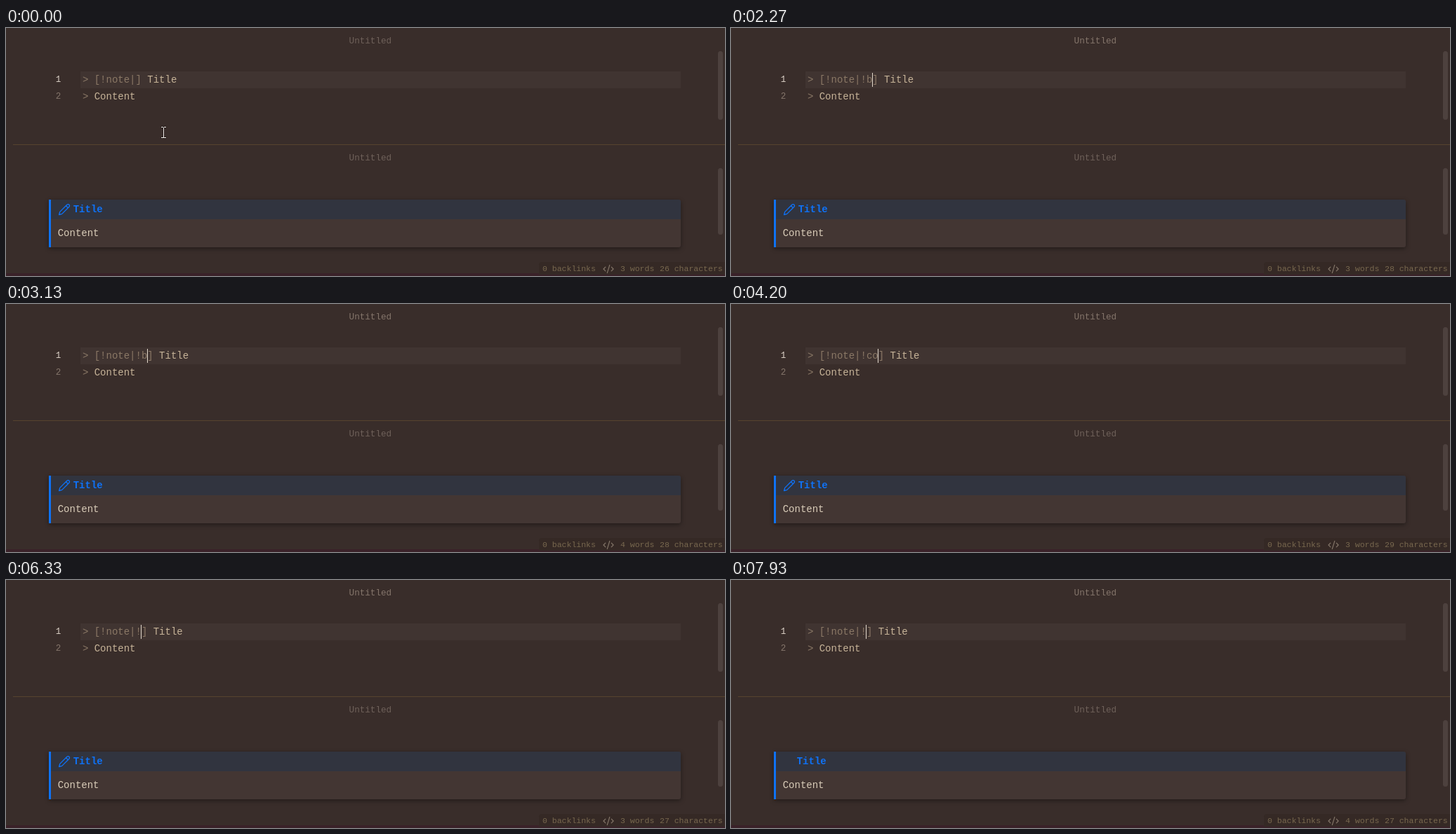
These frames come from a looping animation (1024x354 px, 8 s). An HTML page with a canvas:

```html
<!DOCTYPE html>
<html lang="en">
<head>
<meta charset="utf-8">
<title>Callout editor</title>
<style>
  html, body { margin: 0; width: 100%; height: 100%; overflow: hidden; background: #392d2a; }
  canvas { display: block; }
</style>
</head>
<body>
<canvas id="stage" width="1024" height="354"></canvas>
<script>
const ctx = document.getElementById('stage').getContext('2d');
const LOOP = 8000;
const CHAR = 8.4;
const META_X = 125.7;
const MONO = '"Liberation Mono", monospace';

const C = {
  bg: '#392d2a', line: '#403431', divider: '#57432f', thumb: '#4d413e',
  dim: '#6f615a', bright: '#84756b', mark: '#8a7866', text: '#c6b398',
  body: '#d9ccb8', blue: '#0f72f7', head: '#31343f', box: '#433633',
  status: '#352925', statusText: '#78684f', edge: '#3a2229'
};

const pencil = new Path2D('M17 3a2.83 2.83 0 1 1 4 4L7.5 20.5 2 22l1.5-5.5zM15 5l4 4');
const codeIcon = new Path2D('M18 16l4-4-4-4M6 8l-4 4 4 4M14.5 4l-5 16');

// Each step overrides part of the state from its time onwards.
const steps = [
  [0, { meta: '', words: 3, look: 'full', caret: false, mouse: true, focus: false }],
  [600, { caret: true, focus: true }],
  [730, { mouse: false }],
  [1130, { caret: false }],
  [1600, { meta: '!', caret: true }],
  [2130, { caret: false }],
  [2270, { meta: '!b', caret: true }],
  [2330, { meta: '!bg' }],
  [2400, { look: 'plain' }],
  [2470, { words: 4 }],
  [2930, { caret: false }],
  [3070, { meta: '!b', caret: true }],
  [3130, { look: 'full' }],
  [3470, { meta: '!' }],
  [3670, { words: 3 }],
  [3930, { caret: false }],
  [4130, { meta: '!c', caret: true }],
  [4200, { meta: '!co' }],
  [4330, { words: 4 }],
  [4400, { meta: '!c' }],
  [4600, { meta: '!' }],
  [4670, { meta: '!i' }],
  [4730, { meta: '!ic' }],
  [4800, { meta: '!ico' }],
  [4930, { meta: '!icon' }],
  [5000, { look: 'noIcon' }],
  [5530, { caret: false }],
  [6070, { meta: '!', look: 'blankIcon', caret: true }],
  [6130, { look: 'full' }],
  [6270, { words: 3 }],
  [6670, { meta: '!t' }],
  [6730, { meta: '!te' }],
  [6800, { meta: '!tex' }],
  [6870, { words: 4 }],
  [7000, { meta: '!text' }],
  [7070, { look: 'noTitle' }],
  [7530, { caret: false }],
  [7930, { meta: '!', look: 'blankIcon', caret: true }]
];

function stateAt(t) {
  return Object.assign({}, ...steps.filter(s => s[0] <= t).map(s => s[1]));
}

function rect(x, y, w, h, color) {
  ctx.fillStyle = color;
  ctx.fillRect(x, y, w, h);
}

function round(x, y, w, h, r, color) {
  ctx.fillStyle = color;
  ctx.beginPath();
  ctx.roundRect(x, y, w, h, r);
  ctx.fill();
}

function text(str, x, y, color, size = 14, weight = 400) {
  ctx.font = `${weight} ${size}px ${MONO}`;
  ctx.fillStyle = color;
  ctx.fillText(str, x, y);
}

function icon(path, x, y, scale, color, width) {
  ctx.save();
  ctx.translate(x, y);
  ctx.scale(scale, scale);
  ctx.strokeStyle = color;
  ctx.lineWidth = width;
  ctx.lineCap = ctx.lineJoin = 'round';
  ctx.stroke(path);
  ctx.restore();
}

function drawFrame(focus) {
  rect(0, 0, 1024, 354, C.bg);
  rect(0, 350, 1024, 4, C.edge);
  rect(10, 166, 1014, 1, C.divider);
  round(1014, 33, 7, 98, 3.5, C.thumb);
  round(1014, 200, 7, 95, 3.5, C.thumb);
  text('Untitled', 488.6, 22, focus ? C.bright : C.dim, 12.6);
  text('Untitled', 488.6, 189, C.dim, 12.6);
}

function drawEditor({ meta, caret }) {
  rect(106, 62, 855, 24, C.line);
  text('1', 70.8, 77, '#ddd3c8', 12.6);
  text('2', 70.8, 101, C.bright, 12.6);
  const tag = `[!note|${meta}]`;
  text('>', META_X - 2 * CHAR, 78, C.mark);
  text(tag, META_X, 78, C.mark);
  text('Title', META_X + (tag.length + 1) * CHAR, 78, C.text);
  text('>', META_X - 2 * CHAR, 102, C.mark);
  text('Content', META_X, 102, C.text);
  if (caret) rect(Math.floor(META_X + (7 + meta.length) * CHAR), 64, 1, 20, '#e6dccf');
}

function drawCallout(look) {
  const plain = look === 'plain';
  const x = plain ? 70.7 : 73.7;
  if (!plain) {
    ctx.save();
    ctx.shadowColor = 'rgba(0,0,0,.4)';
    ctx.shadowBlur = 6;
    ctx.shadowOffsetY = 2;
    round(61, 245, 900, 68, [0, 3, 3, 0], C.box);
    ctx.restore();
    round(61, 245, 900, 28, [0, 3, 0, 0], C.head);
    rect(61, 245, 3, 68, C.blue);
  }
  if (look !== 'noIcon' && look !== 'blankIcon') {
    icon(pencil, x + 0.4, 250, 0.75, C.blue, 1.75);
  }
  const indent = { noIcon: 0, blankIcon: 20 }[look] ?? 22;
  if (look !== 'noTitle') text('Title', x + indent, 263, C.blue, 14, 700);
  text('Content', x, 297, C.body);
}

function drawStatus({ meta, words }) {
  round(759, 334, 265, 18, [4, 0, 0, 0], C.status);
  text('0 backlinks', 764, 347, C.statusText, 11.5);
  icon(codeIcon, 849.6, 335.6, 0.7, '#85776a', 1.7);
  text(`${words} words`, 875, 347, C.statusText, 11.5);
  text(`${26 + meta.length} characters`, 931, 347, C.statusText, 11.5);
}

function drawPointer(t) {
  const p = Math.min(1, Math.max(0, (t - 40) / 520));
  const e = p * p * (3 - 2 * p);
  const x = Math.round(224 - 53 * e);
  const y = Math.round(149 - 75 * e);
  const beam = (grow, color) => {
    const g = grow * 2;
    rect(x - grow, y - 7 - grow, 1 + g, 15 + g, color);
    for (const dy of [-8, 7]) {
      rect(x - 3 - grow, y + dy - grow, 3 + g, 1 + g, color);
      rect(x + 1 - grow, y + dy - grow, 3 + g, 1 + g, color);
    }
  };
  beam(0.5, 'rgba(20,14,12,.7)');
  beam(0, '#f2eeea');
}

function draw(now) {
  const t = now % LOOP;
  const s = stateAt(t);
  drawFrame(s.focus);
  drawEditor(s);
  drawCallout(s.look);
  drawStatus(s);
  if (s.mouse) drawPointer(t);
}

let start;
function tick(now) {
  start ??= now;
  draw(now - start);
  requestAnimationFrame(tick);
}
draw(0);
requestAnimationFrame(tick);
</script>
</body>
</html>
```
